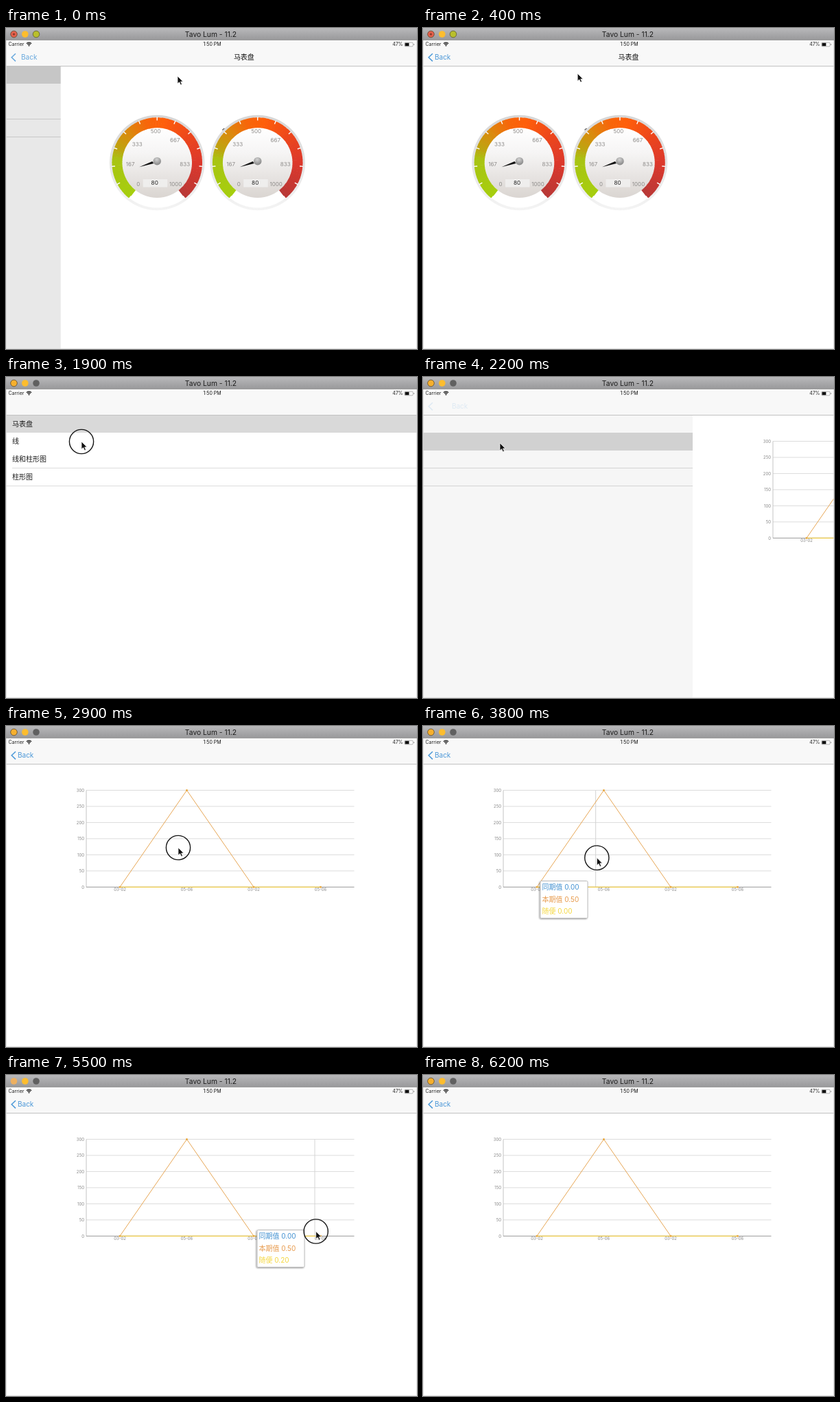
Recreate the animation shown at these times as an HTML page. Size 599 by 467 pixels, loop 6300 ms.

```html
<!DOCTYPE html>
<html lang="zh">
<head>
<meta charset="utf-8">
<style>
html, body { margin: 0; width: 100%; height: 100%; overflow: hidden; background: #fff; }
svg { display: block; width: 599px; height: 467px; }
text { font-family: Inter, "Noto Sans CJK SC", "Noto Sans CJK", sans-serif; }
</style>
</head>
<body>
<svg id="stage" viewBox="0 0 599 467">
  <defs>
    <linearGradient id="bar" x2="0" y2="1">
      <stop stop-color="#b9b9bb"/><stop offset="1" stop-color="#98989a"/>
    </linearGradient>
    <linearGradient id="bezel" x2="0" y2="1">
      <stop stop-color="#d6d6d6"/><stop offset=".5" stop-color="#e4e4e4"/><stop offset="1" stop-color="#f4f4f4"/>
    </linearGradient>
    <linearGradient id="face" x2="0" y2="1">
      <stop stop-color="#fff"/><stop offset=".35" stop-color="#f6f5f5"/><stop offset="1" stop-color="#dad5d1"/>
    </linearGradient>
    <radialGradient id="hub" cx=".45" cy=".3" r=".7">
      <stop stop-color="#d2d2d2"/><stop offset="1" stop-color="#858585"/>
    </radialGradient>
    <filter id="soft" x="-20%" y="-20%" width="140%" height="140%">
      <feDropShadow dx="-1" dy="1" stdDeviation="1" flood-opacity=".4"/>
    </filter>
  </defs>
</svg>
<script>
const LOOP = 6300, W = 599, H = 467;
const stage = document.getElementById('stage');

function add(parent, tag, attrs = {}, text) {
  const el = document.createElementNS('http://www.w3.org/2000/svg', tag);
  set(el, attrs);
  if (text !== undefined) el.textContent = text;
  parent.appendChild(el);
  return el;
}
function set(el, attrs) {
  for (const k in attrs) el.setAttribute(k, attrs[k]);
}
const group = parent => add(parent, 'g');
const rect = (p, x, y, width, height, fill, more) => add(p, 'rect', { x, y, width, height, fill, ...more });
const circle = (p, cx, cy, r, fill, more) => add(p, 'circle', { cx, cy, r, fill, ...more });
const line = (p, x1, y1, x2, y2, stroke, w = 1) =>
  add(p, 'line', { x1, y1, x2, y2, stroke, 'stroke-width': w });
const label = (p, x, y, size, fill, s, anchor = 'middle') =>
  add(p, 'text', { x, y, 'font-size': size, fill, 'text-anchor': anchor }, s);
const show = (el, on) => el.setAttribute('display', on ? 'inline' : 'none');
const move = (el, x, y = 0) => el.setAttribute('transform', `translate(${x.toFixed(2)} ${y.toFixed(2)})`);

// List page
const list = group(stage);
rect(list, 0, 55, W, H - 55, '#fff');
const picked = rect(list, 0, 55, W, 26, '#d9d9d9');
['马表盘', '线', '线和柱形图', '柱形图'].forEach((s, i) =>
  label(list, 9, 71.7 + i * 25.7, 10, '#1a1a1a', s, 'start'));
line(list, 9, 132.5, W, 132.5, '#dcdcdc');
line(list, 0, 158.5, W, 158.5, '#dcdcdc');
const dim = rect(stage, 0, 55, W, H - 55, '#000');

// Gauge page
const gauges = group(stage);
rect(gauges, 0, 55, W, H - 55, '#fff');

const SWEEP = 284;
const polar = (deg, r) => {
  const a = deg * Math.PI / 180;
  return [Math.sin(a) * r, -Math.cos(a) * r];
};
const ringStops = [
  [-142, 166, 206, 14], [-86, 168, 196, 18], [-72, 188, 166, 16], [-46, 216, 140, 14],
  [-15, 247, 102, 10], [10, 255, 94, 10], [50, 236, 70, 28], [90, 220, 56, 44], [142, 184, 56, 54]
];
function ringColor(deg) {
  let i = 1;
  while (i < ringStops.length - 1 && deg > ringStops[i][0]) i++;
  const a = ringStops[i - 1], b = ringStops[i], k = (deg - a[0]) / (b[0] - a[0]);
  return `rgb(${[1, 2, 3].map(c => Math.round(a[c] + (b[c] - a[c]) * k))})`;
}
function gauge(cx, cy) {
  const g = group(gauges);
  move(g, cx, cy);
  circle(g, 0, 0, 69.3, 'url(#bezel)');
  circle(g, 0, 0, 65.5, '#fff');
  circle(g, 0, 0, 51, 'url(#face)');
  const n = 71, step = SWEEP / n;
  for (let i = 0; i < n; i++) {
    const a = i * step - SWEEP / 2, b = Math.min(a + step + 0.6, SWEEP / 2);
    add(g, 'path', {
      d: `M${polar(a, 58.3)}A58.3 58.3 0 0 1 ${polar(b, 58.3)}`,
      fill: 'none', 'stroke-width': 15, stroke: ringColor(a + step / 2)
    });
  }
  for (let i = 0; i <= 12; i++) {
    const a = i * SWEEP / 12 - SWEEP / 2;
    line(g, ...polar(a, 61.5), ...polar(a, 66.5), '#fff', 1.4);
  }
  [[0, -27.5, 31], [167, -39, 2], [333, -29, -27], [500, -2, -46],
   [667, 26, -33.5], [833, 40.5, 2], [1000, 27, 31]]
    .forEach(([v, x, y]) => label(g, x, y + 3, 8, '#8e8c8a', v));
  rect(g, -20.5, 24, 35.5, 11.5, '#efeeed');
  label(g, -3.5, 32.4, 8.2, '#222', '80');
  add(g, 'path', { d: 'M-26 6.2L-7-2L-5 1Z', fill: '#111' });
  circle(g, 0, -2.3, 5.8, 'url(#hub)');
}
gauge(140.5, 196);
gauge(287, 196);
line(gauges, 235.5, 148.5, 238.5, 146, '#666', 1.4);

// Chart page
const chart = group(stage);
rect(chart, 0, 55, W, H - 55, '#fff');
const X0 = 166, STEP = 97.5, BASE = 234.3, TOP = 93.5;
for (let i = 0; i <= 6; i++) {
  const y = BASE - (BASE - TOP) * i / 6;
  if (i) line(chart, 117, y, 507.5, y, '#dcdcdc');
  label(chart, 114, y + 2.2, 6, '#888', i * 50, 'end');
}
line(chart, 117, TOP, 117, BASE, '#c4c4c4');
line(chart, 117, BASE, 507.5, BASE, '#999');
['03-02', '05-06', '03-02', '05-06'].forEach((s, i) =>
  label(chart, X0 + i * STEP, 240.2, 6, '#888', s));
const guide = line(chart, 0, TOP, 0, BASE, '#d4d4d4');
const peak = [X0 + STEP, TOP], low = [X0 + 2 * STEP, BASE], end = [X0 + 3 * STEP, BASE];
add(chart, 'path', { d: `M${X0} ${BASE}L${peak}L${low}`, fill: 'none', stroke: '#e7a654' });
line(chart, X0, BASE, ...end, '#f0cc48', 1.2);
[[X0, BASE], peak, low, end].forEach(([x, y]) => circle(chart, x, y, 1.5, '#e9a940'));

const tip = group(chart);
rect(tip, 0, 225.5, 69, 54, '#fff', { rx: 1.5, stroke: '#bdbdbd', filter: 'url(#soft)' });
const tipNames = ['同期值', '本期值', '随便'];
const tipRows = ['#3f8fd0', '#e7994a', '#f4d63c'].map((c, i) =>
  label(tip, 2.5, 237.9 + i * 17.6, 10, c, '', 'start'));
const tipValues = [['0.00', '0.50', '0.00'], ['0.00', '300.00', '0.00'], ['0.00', '0.50', '0.20']];

// Navigation and status bars
rect(stage, 0, 17, W, 38.5, '#f8f8f8');
line(stage, 0, 55.5, W, 55.5, '#c2c2c2');
const back = group(stage);
add(back, 'path', { d: 'M14 37.2L8.2 42.8L14 48.4', fill: 'none', stroke: '#4b98d8', 'stroke-width': 1.5 });
const backText = label(back, 17, 46.2, 10, '#4b98d8', 'Back', 'start');
const title = label(stage, 299.5, 46, 10, '#111', '马表盘');

label(stage, 3.5, 26.2, 7, '#222', 'Carrier', 'start');
[[5, 1.3], [3, 1.3]].forEach(([r, w]) => {
  const k = r * 0.72;
  add(stage, 'path', {
    d: `M${33.5 - k} ${26.2 - k}A${r} ${r} 0 0 1 ${33.5 + k} ${26.2 - k}`,
    fill: 'none', stroke: '#111', 'stroke-width': w
  });
});
circle(stage, 33.5, 25.4, 1, '#111');
label(stage, 300.5, 26.2, 7, '#111', '1:50 PM');
label(stage, 578.5, 26.2, 7, '#222', '47%', 'end');
rect(stage, 581, 21.2, 12, 5.6, '#fff', { rx: 1, stroke: '#999', 'stroke-width': 0.7 });
rect(stage, 581.6, 21.8, 5.8, 4.4, '#111');
rect(stage, 594, 23, 1, 2, '#999');

// Window frame
rect(stage, 0, 0, W, 17.5, 'url(#bar)');
line(stage, 0, 17.5, W, 17.5, '#8c8c8c', 0.7);
label(stage, 298.5, 12.8, 10.3, '#1c1c1c', 'Tavo Lum - 11.2');
const lamps = [11.5, 27.8, 44].map(x => circle(stage, x, 9, 4.8, '#fdbd2e'));
const lampDot = circle(stage, 11.5, 9, 1.6, '#8a3a2c');
add(stage, 'path', { d: `M.5 18V${H - 0.5}H${W - 0.5}V18`, fill: 'none', stroke: '#dedede', 'stroke-width': 0.8 });

// Pointer
const pointer = group(stage);
const ring = circle(pointer, 0, 0, 17.6, 'none', { stroke: '#151515', 'stroke-width': 1.4 });
add(pointer, 'path', {
  d: 'M0 0V11L2.6 8.7L4.5 12.7L6.4 11.9L4.6 8H8Z',
  fill: '#111', stroke: '#fff', 'stroke-width': 0.7
});
const path = [
  [0, 250, 70], [300, 240, 68], [900, 40, 44], [1200, 24, 43], [1500, 45, 55], [1800, 109, 93],
  [1900, 110, 94], [2200, 112, 96], [2700, 245, 172], [2900, 251, 177], [3500, 252, 188],
  [4600, 259.5, 208.5], [5500, 451.7, 227.5], [5700, 470, 226], [6100, 625, 150], [LOOP, 625, 150]
];
function pointerAt(t) {
  let i = 1;
  while (t > path[i][0]) i++;
  const [ta, xa, ya] = path[i - 1], [tb, xb, yb] = path[i];
  const u = (t - ta) / (tb - ta), k = u * u * (3 - 2 * u);
  return [xa + (xb - xa) * k, ya + (yb - ya) * k];
}

// Share of a page slide still to go
const left = (t, start) => Math.pow(1 - Math.min(1, Math.max(0, (t - start) / 500)), 4);

function draw(t) {
  const onChart = t >= 2100;
  const away = t < 1200 ? left(t, -198) : onChart ? left(t, 2150) : 1 - left(t, 1200);
  const page = onChart ? chart : gauges;

  show(gauges, !onChart);
  show(chart, onChart);
  move(page, away * W);
  move(list, -180 * (1 - away));
  set(dim, { opacity: 0.105 * (1 - away) });
  set(picked, { y: t < 2000 ? 55 : 81 });

  const pressed = t >= 1100 && t < 1700;
  set(back, { opacity: pressed ? 0.15 * (1 - away) : Math.max(0, 1 - away * 1.3) });
  set(backText, { x: 17 + away * 38 });
  show(title, !onChart);
  set(title, { x: 299.5 + away * 356, opacity: Math.max(0, 1 - Math.max(0, away - 0.2) * 1.6) });

  const [x, y] = pointerAt(t);
  move(pointer, x, y);
  show(ring, (t >= 1900 && t < 2100) || (t >= 2800 && t < 5700));

  const touching = t >= 3600 && t < 5700;
  show(tip, touching);
  show(guide, touching);
  if (touching) {
    const gx = x - 1.7, i = Math.max(0, Math.min(2, Math.floor((gx - X0) / STEP)));
    set(guide, { x1: gx, x2: gx });
    move(tip, X0 + i * STEP + 5);
    tipRows.forEach((row, k) => row.textContent = `${tipNames[k]} ${tipValues[i][k]}`);
  }

  const early = t < 600;
  set(lamps[0], {
    fill: early ? '#e4604c' : t < 4300 || t >= 5700 ? '#f6b02e' : '#eeb060',
    stroke: t >= 5000 && t < 5700 ? 'none' : '#5c4a30', 'stroke-width': 0.8
  });
  set(lamps[2], {
    fill: t < 1500 ? '#b9bf2c' : '#606060',
    stroke: t < 1500 ? '#5a5a30' : 'none', 'stroke-width': 0.8
  });
  show(lampDot, early);
}

const begin = performance.now();
function tick() {
  const t = (performance.now() - begin) % LOOP;
  draw(Math.floor(t / 100) * 100);
  requestAnimationFrame(tick);
}
tick();
</script>
</body>
</html>
```
